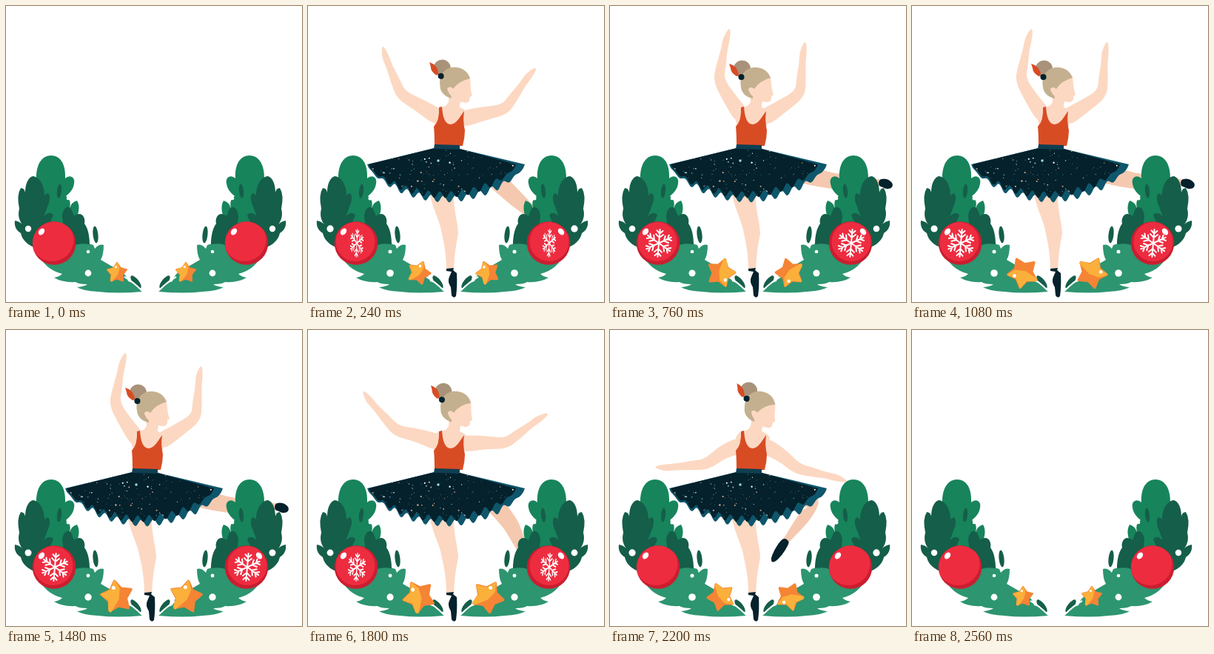
An HTML page that plays this animation: 400x400 px, repeating every 2.6 s.

```html
<!DOCTYPE html>
<html lang="en">
<head>
<meta charset="utf-8">
<title>Ballerina in a winter wreath</title>
<style>
  html, body { margin: 0; width: 100%; height: 100%; overflow: hidden; background: #fff; }
  svg { display: block; width: 100vw; height: 100vh; }
  .skin { fill: #fcd8c2; }
  .ink { fill: #04212c; }
  .teal { fill: #0e566b; }
  .mid { fill: #17845c; }
  .dark { fill: #155e49; }
  .light { fill: #2d9570; }
</style>
</head>
<body>
<svg viewBox="0 0 400 400">
  <defs>
    <g id="wreath">
      <path class="mid" d="M41 236C40 213 49 202 61 202C73 202 81 213 80 233C86 227 94 231 92 240C91 247 87 252 81 257Q89 262 86 274Q88 265 96 263C101 271 98 284 92 291L96 330L50 322L38 270Z"/>
      <path class="dark" d="M36 230C46 231 52 243 52 256C60 247 61 262 56 271Q53 280 51 284Q60 276 64 283Q60 293 55 300L60 330L38 326C25 321 21 312 20 307C13 303 11 296 12 290Q18 291 22 295C17 289 16 281 18 274Q14 255 20 246Q25 246 26 252C26 240 30 232 36 230Z"/>
      <path class="light" d="M42 332L94 322Q106 318 118 323L120 328Q126 321 132 323Q132 336 128 343L147 354Q163 361 165 372Q178 375 184 386Q150 389 124 386Q104 385 96 380Q106 379 110 376Q98 376 94 373Q76 374 65 367Q72 366 76 362Q52 356 42 332Z"/>
      <path class="dark" d="M76 285C76 274 83 268 88 274L92 284C102 276 108 286 106 294C112 302 113 315 113 322Q100 320 94 323L80 312Z"/>
      <ellipse class="dark" cx="72" cy="250" rx="3" ry="9.500" transform="rotate(6 72 250)"/>
      <ellipse class="dark" cx="121" cy="309" rx="3.500" ry="11.500" transform="rotate(-6 121 309)"/>
      <ellipse class="dark" cx="175.500" cy="373" rx="4" ry="10.500" transform="rotate(-38 175.500 373)"/>
      <path d="M160 366Q171 372 184 385" fill="none" stroke="#fff" stroke-width="2"/>
    </g>
    <clipPath id="ball"><circle r="29"/></clipPath>
    <clipPath id="skirtClip"><path id="skirtEdge"/></clipPath>
  </defs>

  <g id="dancer">
    <path id="backLeg" fill="#f5c9af"/>
    <path id="backShoe" class="ink"/>
    <path class="skin" d="M164 250C168 275 178 288 181 308Q187 332 187 358L197 358Q198 330 203 308C203 292 196 276 197 250Z"/>
    <path class="ink" d="M187 355L197 354L196 357L201 361Q202 378 200 392Q197 396 194 391L193 380Q188 372 191 366L194 359L187 358Z"/>
    <path id="underskirt" class="teal"/>
    <path id="skirt" class="ink"/>
    <g id="specks" clip-path="url(#skirtClip)"></g>
    <path id="armL" class="skin"/>
    <path id="armR" class="skin"/>
    <path class="skin" d="M191 118L206 122L205 137Q216 141 216 148L211 164L196 170L172 164L169 149Q172 137 182 136Q192 135 191 118Z"/>
    <path d="M177 137L181 136C182 150 185 160 193 160C201 159 205 150 211 142Q209 155 212 168Q212 178 209 189L171 189Q171 172 170 163Q178 155 177 137Z" fill="#d84c24"/>
    <path d="M171 187L205 188L205 194L170 193Z" fill="#0f3f52"/>
    <g id="head">
      <path class="skin" d="M186 105L217 96Q218 106 219 113L221 120L218 122Q219 130 212 130L206 129L203 138L191 135Z"/>
      <circle cx="178.500" cy="85" r="11.500" fill="#a8937a"/>
      <path d="M177 109C174 93 184 82 198 83Q212 84 217 97Q202 101 195 112Q190 108 187 112Q188 118 193 122L193 125C183 123 177 116 177 109Z" fill="#c4b08f"/>
      <path d="M161 78L166 80Q173 84 174 93L171 95Q163 90 163 84Z" fill="#d84c24"/>
      <circle class="ink" cx="177.500" cy="96" r="4"/>
    </g>
  </g>

  <use href="#wreath"/>
  <use href="#wreath" transform="translate(390) scale(-1 1)"/>
  <g id="trim"></g>
</svg>
<script>
const LOOP = 2600;
const $ = id => document.getElementById(id);
const trim = $('trim');
const lerp = (a, b, u) => a + (b - a) * u;
const ramp = (t, from, to) => Math.max(0, Math.min(1, (t - from) / (to - from)));
const smooth = u => u * u * (3 - 2 * u);

function set(node, attrs) {
  for (const name in attrs) node.setAttribute(name, attrs[name]);
  return node;
}
const add = (parent, tag, attrs = {}) =>
  parent.appendChild(set(document.createElementNS('http://www.w3.org/2000/svg', tag), attrs));

// Point at a distance and an angle in degrees from another point.
const reach = ([x, y], length, angle) => {
  const a = angle * Math.PI / 180;
  return [x + length * Math.cos(a), y + length * Math.sin(a)];
};
const between = (p, q, u) => [lerp(p[0], q[0], u), lerp(p[1], q[1], u)];

// Closed smooth outline around a chain of joints with given half widths.
function limb(joints, radii) {
  const left = [], right = [];
  joints.forEach(([x, y], i) => {
    const a = joints[Math.max(0, i - 1)], b = joints[Math.min(joints.length - 1, i + 1)];
    const dx = b[0] - a[0], dy = b[1] - a[1], k = radii[i] / Math.hypot(dx, dy);
    left.push([x - dy * k, y + dx * k]);
    right.unshift([x + dy * k, y - dx * k]);
  });
  const ring = left.concat(right), n = ring.length;
  const half = i => between(ring[i % n], ring[(i + 1) % n], 0.5);
  return 'M' + half(n - 1) + ring.map((p, i) => 'Q' + p + ' ' + half(i)).join('') + 'Z';
}

function drawArm(id, root, shoulder, upper, fore) {
  const elbow = reach(shoulder, 55, upper), wrist = reach(elbow, 42, fore);
  const palm = reach(wrist, 14, fore), tip = reach(palm, 14, fore + 8);
  const joints = [root, between(shoulder, elbow, 0.5), elbow, between(elbow, wrist, 0.45), wrist, palm, tip];
  set($(id), { d: limb(joints, [12, 9, 7.5, 6.5, 4.2, 5, 1.5]) });
}

// Bend runs from 0 (arms raised, leg stretched) to 2 (arms lowered, knee drawn in).
function drawDancer(bend) {
  const u = bend / 2;
  drawArm('armL', [182, 154], [174, 147], lerp(240, 141, u), lerp(281, 175, u));
  drawArm('armR', [204, 154], [212, 150], lerp(-35, 43, u), lerp(-86, 13, u));

  const hip = [240, 222], calf = lerp(2, 128, u), thigh = 14 + 35 * Math.sin(Math.PI * u);
  const knee = reach(hip, lerp(60, 40, u), thigh), ankle = reach(knee, 65, calf);
  const heel = reach(ankle, 6, calf), toe = reach(ankle, lerp(19, 36, u), lerp(14, 124, u));
  set($('backLeg'), { d: limb([hip, knee, between(knee, ankle, 0.3), ankle, heel], [13, 11, 9.5, 4.5, 4]) });
  set($('backShoe'), { d: limb([ankle, heel, between(heel, toe, 0.5), toe], [4, 6, 6.5, 3]) });
  set($('head'), { transform: `rotate(${bend * 5} 200 135)` });
}

// Skirt outline with a ruffled hem.
function skirtPath(left, right, depth) {
  let d = 'M171 192L205 193';
  for (let i = 0; i <= 120; i++) {
    const u = i / 120, sag = Math.sin(Math.PI * u);
    const y = 214 + depth * sag ** 0.65 + 4.5 * Math.sin(u * 82) * Math.min(1, sag * 2);
    d += `L${lerp(right, left, u)} ${y}`;
  }
  return d + 'Z';
}
const skirt = skirtPath(82, 281, 41);
set($('underskirt'), { d: skirtPath(80, 293, 47) });
set($('skirt'), { d: skirt });
set($('skirtEdge'), { d: skirt });

let seed = 11;
const random = () => (seed = seed * 16807 % 2147483647) / 2147483647;
for (let i = 0; i < 190; i++) {
  add($('specks'), 'circle', {
    cx: 85 + random() * 200, cy: 195 + random() * 65, r: 0.4 + random() ** 4 * 0.9,
    fill: ['#fff', '#7fb9c2', '#c9a489', '#3f7f8c'][i % 4]
  });
}
add($('specks'), 'circle', { cx: 176, cy: 209, r: 1.7, fill: '#9fe0dc' });

const dots = [[30, 301, 4.2], [111, 361, 4.4], [84, 260, 2.3], [111, 332, 2.3]]
  .flatMap(([x, cy, r]) => [x, 390 - x].map(cx => ({ r, node: add(trim, 'circle', { cx, cy, fill: '#fff' }) })));

const baubles = [-1, 1].map(side => {
  const group = add(trim, 'g', { transform: `translate(${195 + side * 130} 320.500)` });
  add(group, 'circle', { r: 29.3, fill: '#cb1e30' });
  const face = add(group, 'circle', { fill: '#ee2c40', 'clip-path': 'url(#ball)' });
  const shine = add(group, 'ellipse', { rx: 3.6, ry: 5, fill: '#fff' });
  const flake = add(group, 'g', { fill: 'none', stroke: '#fff', 'stroke-width': 2, 'stroke-linecap': 'round' });
  for (let a = 5; a < 360; a += 60) {
    add(flake, 'path', { d: 'M0 0V-18.500M-4-17L0-13L4-17M-5-12L0-7.500L5-12', transform: `rotate(${a})` });
  }
  return { side, face, shine, flake };
});

const starPath = 'M' + Array.from({ length: 10 }, (_, i) =>
  reach([0, 0], i % 2 ? 0.54 : 0.93, i * 36 - 90)).join('L') + 'Z';
const stars = [-1, 1].map(side => {
  const node = add(trim, 'g');
  const round = (d, fill, width) =>
    add(node, 'path', { d, fill, stroke: fill, 'stroke-width': width, 'stroke-linejoin': 'round' });
  round(starPath, '#f58435', 0.16);
  round('M0-.95L.2-.45L.05.15L-.5.8L-.6.7L-.5.15L-.9-.28L-.28-.45Z', '#fbb03b', 0.08);
  add(node, 'circle', { cx: -0.12, cy: -0.55, r: 0.11, fill: '#fff' });
  return { side, node };
});

function draw(t) {
  const rise = ramp(t, 20, 560), fall = ramp(t, 1640, 2240);
  drawDancer(2 * ((1 - rise) ** 2.2 + 1 - (1 - fall) ** 2.2));
  set($('dancer'), { opacity: ramp(t, 40, 160) * ramp(t, 2440, 2280) });

  const width = smooth(ramp(t, 80, 400)) * ramp(t, 2040, 1680);
  baubles.forEach(({ side, face, shine, flake }) => {
    const decorated = width > 0, light = decorated ? side : -1;
    set(face, decorated ? { cx: light, cy: -2, r: 26.5 } : { cx: light * 2.5, cy: -4.5, r: 29 });
    set(shine, { transform: `translate(${light * 17} -15.500) rotate(${light * -38})` });
    set(flake, { transform: `translate(1 0) scale(${width} 1)` });
  });

  const swing = smooth(ramp(t, 0, 1640) * ramp(t, 2560, 1640));
  const size = 14.5 + 8.5 * Math.sqrt(swing);
  stars.forEach(({ side, node }) => set(node, {
    transform: `translate(${196.5 + side * 46.5} 360.500) rotate(${-side * 360 * swing}) scale(${size})`
  }));

  const pulse = 1 + 0.12 * Math.sin(Math.PI * t * 4 / LOOP) ** 2;
  dots.forEach(({ node, r }) => set(node, { r: r * pulse }));
}

function tick(now) {
  draw(now % LOOP);
  requestAnimationFrame(tick);
}
draw(0);
requestAnimationFrame(tick);
</script>
</body>
</html>
```
